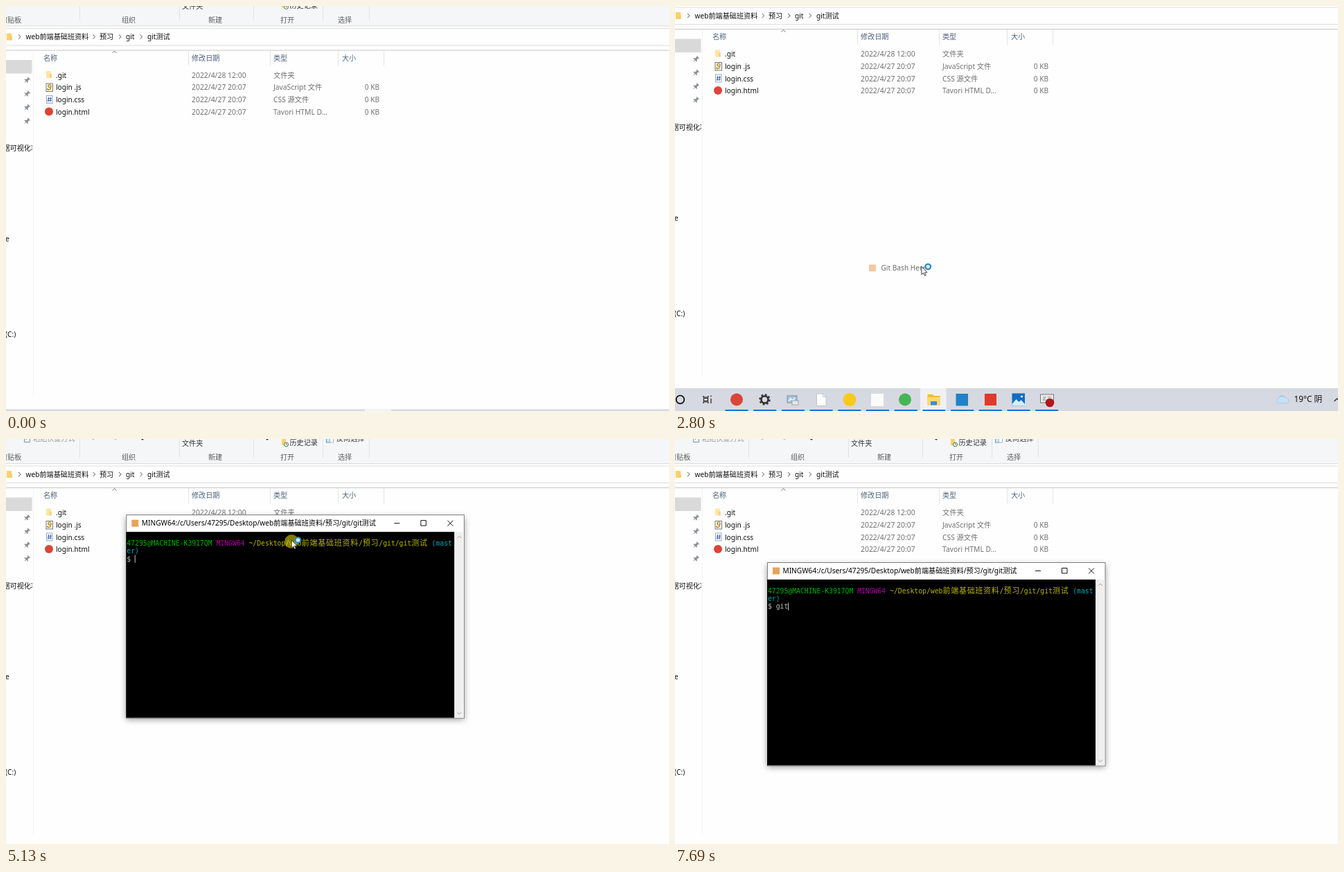
An HTML page that plays this animation: 957 px wide and 585 px high, repeating every 8 s.

```html
<!DOCTYPE html>
<html lang="zh">
<head>
<meta charset="utf-8">
<title>Git Bash Here</title>
<style>
html, body { margin: 0; width: 100%; height: 100%; overflow: hidden; background: #fefefe; }
svg { display: block; width: 100vw; height: 100vh; }
text { font: 10.15px "Noto Sans", "Noto Sans CJK SC", "Noto Sans CJK", sans-serif; white-space: pre; }
.mono { font: 9.75px "DejaVu Sans Mono", "Noto Sans Mono", "Noto Sans CJK SC", monospace; }
.wide { font: 11px "Noto Sans CJK SC", "Noto Sans CJK", sans-serif; letter-spacing: .74px; }
</style>
</head>
<body>
<svg id="stage" viewBox="0 0 957 585" preserveAspectRatio="none"></svg>
<script>
const LOOP = 8000;
const stage = document.getElementById('stage');

function el(parent, tag, attrs = {}, content) {
  const node = document.createElementNS('http://www.w3.org/2000/svg', tag);
  for (const k in attrs) node.setAttribute(k, attrs[k]);
  if (content !== undefined) node.textContent = content;
  parent.appendChild(node);
  return node;
}
const group = parent => el(parent, 'g');
const rect = (p, x, y, width, height, fill, more) => el(p, 'rect', { x, y, width, height, fill, ...more });
const disc = (p, cx, cy, r, fill, more) => el(p, 'circle', { cx, cy, r, fill, ...more });
const line = (p, d, stroke, width = 1, more) =>
  el(p, 'path', { d, stroke, 'stroke-width': width, fill: 'none', ...more });
const shape = (p, d, fill, more) => el(p, 'path', { d, fill, ...more });
// Text is placed by its left edge and vertical middle.
const label = (p, x, y, s, fill = '#111', more) => el(p, 'text', { x, y: y + 3.7, fill, ...more }, s);
const show = (node, on) => { node.style.display = on ? '' : 'none'; };
const move = (node, [x, y]) => node.setAttribute('transform', `translate(${x.toFixed(2)} ${y.toFixed(2)})`);

// Linear track through [time, ...values] points.
function track(points, t) {
  if (t <= points[0][0]) return points[0].slice(1);
  for (let i = 1; i < points.length; i++) {
    const a = points[i - 1], b = points[i];
    if (t <= b[0]) {
      const k = (t - a[0]) / (b[0] - a[0]);
      return a.slice(1).map((v, j) => v + (b[j + 1] - v) * k);
    }
  }
  return points[points.length - 1].slice(1);
}
const within = (t, ...spans) => spans.some(([a, b]) => t >= a && t < b);

// ---------- Explorer ----------
const desk = group(stage);
const GRAY = '#707070', HEAD = '#4c607a';

function ribbon(p) {
  rect(p, 0, -60, 957, 95.5, '#f5f6f7');
  line(p, 'M0 35.5H957', '#dcddde');
  line(p, 'M106.5-60V27M250.5-60V27M357.5-60V27M457.5-60V27M524.5-60V27', '#e1e2e3');
  [[-8, '剪贴板'], [167, '组织'], [292, '新建'], [396, '打开'], [479, '选择']]
    .forEach(([x, s]) => label(p, x, 26.5, s, '#5c5c5c'));
  line(p, 'M26.5-4V4.5H34.5V-4M28.5 1.5L31-1', '#7d8fa8');
  label(p, 39, -.5, '粘贴快捷方式', '#9a9a9a');
  label(p, 254, 6.5, '文件夹', '#333');
  label(p, 409.5, 5.5, '历史记录', '#333');
  label(p, 477, -.5, '反向选择', '#333');
  rect(p, 398, -2, 6, 11, '#f5d272');
  disc(p, 404.5, 8, 3, '#f5f6f7', { stroke: '#3d7a3d' });
  line(p, 'M404.5 6V8H406', '#3d7a3d', .8);
  rect(p, 462.5, -4, 5, 9, '#cfe6f8', { stroke: '#5b9bd0' });
  rect(p, 467.5, -4, 5, 9, '#fff', { stroke: '#9db8cd' });
  shape(p, 'M194.500-.5h5l-2.500 2.500zM374.500-.5h5l-2.500 2.500z', '#333');
  shape(p, 'M123.500-.5h5l-2.500 2zM155.500-.5h5l-2.500 2z', '#bbb');
}

function folder(p, x, y, fill) {
  rect(p, x, y, 7, 10, fill);
  rect(p, x + 5, y + 4, 3, 6, '#f6c95e', { opacity: .7 });
}

function address(p) {
  line(p, 'M0 39H957M0 63.5H957', '#dedede');
  line(p, 'M0 70.5H957', '#c6c6c6');
  folder(p, 1, 46, '#fbd26b');
  [18, 125.5, 163, 193.5].forEach(x => line(p, `M${x} 48l3.200 3-3.200 3`, '#555'));
  [[28.5, 'web前端基础班资料'], [135, '预习'], [173, 'git'], [204, 'git测试']]
    .forEach(([x, s]) => label(p, x, 51, s));
}

function sidebar(p) {
  rect(p, 0, 84.5, 37.5, 19.5, '#d9d9d9');
  line(p, 'M39.5 71V572', '#f4f4f4');
  for (let i = 0; i < 4; i++) {
    const pin = group(p);
    pin.setAttribute('transform', `translate(30.5 ${113.5 + i * 19.7}) rotate(45)`);
    shape(pin, 'M-2.500-4h5v1h-1v3l2 1.500v.8h-7v-.8l2-1.500v-3h-1zM-.4 2h.9v3h-.9z', '#8a8f96');
  }
  const clip = el(p, 'clipPath', { id: 'side' });
  rect(clip, 0, 71, 38, 520, '#000');
  const names = el(p, 'g', { 'clip-path': 'url(#side)' });
  label(names, -4.5, 212, '据可视化项目');
  label(names, -1, 343, 'e');
  label(names, -1, 481, '(C:)');
  label(names, -2, 498, '·', '#888');
}

function files(p) {
  line(p, 'M263.5 71V93M381.5 71V93M479.5 71V93M545.5 71V93', '#e4e4e4');
  line(p, 'M153.500 74.500l3-3 3 3', '#777');
  [[54, '名称'], [268, '修改日期'], [386, '类型'], [485, '大小']]
    .forEach(([x, s]) => label(p, x, 81.5, s, HEAD));
  const rows = [
    ['.git', '2022/4/28 12:00', '文件夹', ''],
    ['login .js', '2022/4/27 20:07', 'JavaScript 文件', '0 KB'],
    ['login.css', '2022/4/27 20:07', 'CSS 源文件', '0 KB'],
    ['login.html', '2022/4/27 20:07', 'Tavori HTML D...', '0 KB']
  ];
  rows.forEach(([name, date, kind, size], i) => {
    const y = 106.5 + i * 17.7;
    label(p, 72, y, name);
    label(p, 268, y, date, GRAY, { style: 'font-size:10.4px' });
    label(p, 386, y, kind, GRAY, { style: 'font-size:10.3px' });
    label(p, 539, y, size, GRAY, { 'text-anchor': 'end' });
  });
  folder(p, 58, 100.5, '#fde6a4');
  rect(p, 58, 118.5, 9.5, 11.5, '#fff', { stroke: '#777' });
  line(p, 'M64.500 120.500c-5-1-4 3-1.500 3.500s2 4-3 3.500', '#c9a227', 2);
  line(p, 'M65 121v3M60 125.500v2', '#444');
  rect(p, 58.5, 136, 8.5, 11, '#fff', { stroke: '#9ab' });
  line(p, 'M61.700 138l-.8 7M64.700 138l-.8 7M60 140.300h6M59.700 143h6', '#3465b5', 1);
  disc(p, 62, 159, 6, '#db4437');
}

rect(desk, 0, -80, 957, 740, '#fefefe');
ribbon(desk);
address(desk);
sidebar(desk);
files(desk);
const focus = rect(desk, 52.5, 115, 490, 17.5, 'none', { stroke: '#9fd3ef' });

// ---------- Taskbar ----------
const bar = group(desk);
const grad = el(bar, 'linearGradient', { id: 'tint' });
[[0, '#e6d3e2'], [.45, '#dccbe0'], [1, '#d6d8e2']]
  .forEach(([offset, c]) => el(grad, 'stop', { offset, 'stop-color': c }));
rect(bar, 0, 589, 957, 60, '#d6d9e1');
const tint = rect(bar, 598, 589, 359, 60, 'url(#tint)');
const hotRecorder = rect(bar, 518, 589, 38, 34, '#f3f5f8');
const hotFolder = rect(bar, 354, 589, 37.5, 34, '#eff1f5');
const hotTerm = group(bar);
rect(hotTerm, 558, 589, 39.5, 34, '#eff1f5');
rect(hotTerm, 571, 599, 13, 13, '#e9824f');
rect(hotTerm, 558, 620, 39.5, 2.5, '#0078d7');

disc(bar, 7.5, 605.5, 5.8, 'none', { stroke: '#111', 'stroke-width': 1.8 });
line(bar, 'M41 600v2h7v-2M41 611v-2h7v2M41.500 603.500h6v4h-6zM52 599.500v2M52 604v7', '#222', 1.2);
disc(bar, 89, 605.5, 9, '#db4437');
disc(bar, 129.5, 605.5, 5, 'none', { stroke: '#333', 'stroke-width': 2.6 });
disc(bar, 129.5, 605.5, 7, 'none', { stroke: '#333', 'stroke-width': 2.4, 'stroke-dasharray': '2.75 2.75' });
rect(bar, 162, 600, 14, 10, '#a9c6dc', { stroke: '#7e8c99' });
line(bar, 'M164 608l3-4 3 3 3-4', '#fff', 1.3);
rect(bar, 169, 607, 9, 6, '#e6e9ec', { stroke: '#8c98a3', 'stroke-width': .8 });
shape(bar, 'M204.500 597h9l4.500 4.500v13h-13.500z', '#fff', { stroke: '#b6b9be', 'stroke-width': .8 });
line(bar, 'M213.500 597v4.500h4.500', '#b6b9be', .8);
disc(bar, 252, 605.5, 9.5, '#fbc91b');
rect(bar, 283, 597, 18, 18, '#fbfbfb');
disc(bar, 332, 605.5, 9, '#45b653');
shape(bar, 'M364.500 598h7l2 2h9v13.500h-18z', '#f5b93a');
rect(bar, 364.5, 602, 18, 11.5, '#fcd873');
rect(bar, 369, 608, 9, 5.5, '#3d8fd8');
rect(bar, 405.5, 597, 17.5, 17.5, '#1f82c8');
rect(bar, 447, 597, 17, 17, '#e2392c');
rect(bar, 486.5, 596.5, 18.5, 18, '#0f6fc2');
shape(bar, 'M486.500 612l6-7 4 4 3-3 5.500 6v2.500h-18.500z', '#d9ecfa');
disc(bar, 500.5, 601, 1.6, '#fff');
rect(bar, 527.5, 598, 19, 12, '#e9e9e9', { stroke: '#777' });
line(bar, 'M531 602h4l-4 4h4M538 602h5', '#888');
const recDot = disc(bar, 541, 610, 6.3, '#b3161b');
for (let i = 0; i < 12; i++) rect(bar, 72.5 + i * 40.7, 620, 33, 2.2, '#0078d7');
disc(bar, 876, 604, 4.5, '#8fc3ea');
shape(bar, 'M871 611a3.800 3.800 0 0 1 0-7a5 5 0 0 1 9-1a4 4 0 0 1 3 8z', '#c5e1f6', { stroke: '#8fbbe0', 'stroke-width': .6 });
label(bar, 893.5, 605.5, '19°C 阴', '#111', { style: 'font-size:11.8px' });
line(bar, 'M951.500 608l4-4 4 4', '#222', 1.2);

// ---------- Context menus ----------
const menu = group(stage);
function panel(p, x, y, w, h) {
  rect(p, x + 3, y + 3, w, h, '#000', { opacity: .22 });
  rect(p, x + 1.5, y + 1.5, w, h, '#000', { opacity: .3 });
  rect(p, x, y, w, h, '#eeeeee', { stroke: '#a3a3a3' });
}
const rule = (p, x1, x2, y) => line(p, `M${x1} ${y}H${x2}`, '#9b9b9b');
panel(menu, 269.5, 188.5, 178, 276);
const hover = rect(menu, 272, 0, 173.5, 18.5, '#fff');
[268.5, 292.5, 390.5, 414.5, 438.5].forEach(y => rule(menu, 278, 438.5, y));
const items = [
  [201.5, '查看(V)', '>'], [220, '排序方式(O)', '>'], [238.5, '分组依据(P)', '>'], [257, '刷新(E)'],
  [281, '自定义文件夹(F)...'], [305, '粘贴(P)', '-'], [323.5, '粘贴快捷方式(S)', '-'],
  [342, '撤消 移动(U)'], [360, 'Git GUI Here', 'g'], [378.5, 'Git Bash Here', 'g'],
  [403, '授予访问权限(G)', '>'], [427, '新建(W)', '>'], [451.5, '属性(R)']
];
function entry(p, [y, s, kind]) {
  label(p, 297.5, y, s, kind === '-' ? '#858585' : '#000');
  if (kind === '>') line(p, `M432.500 ${y - 5.5}l5.500 5.500-5.500 5.500`, '#222', 1.1);
  if (kind === 'g') rect(p, 280, y - 5, 10, 10, '#e8a35f');
}
items.forEach(item => entry(menu, item));
label(menu, 401, 342, 'Ctrl+Z', '#000');

const sub = group(menu);
panel(sub, 445.5, 228.5, 133, 145);
[[239, '名称'], [257.3, '修改日期'], [275.6, '类型'], [293.9, '大小'], [318, '递增(A)'], [336.3, '递减(D)'], [361, '更多(M)...']]
  .forEach(([y, s]) => label(sub, 473, y, s, '#000'));
rule(sub, 453, 571, 306);
rule(sub, 453, 571, 348.5);

const chosen = group(stage);
entry(chosen, items[9]);

// ---------- Terminal ----------
const term = group(stage);
const blur = el(term, 'filter', { id: 'soft', x: '-10%', y: '-10%', width: '120%', height: '120%' });
el(blur, 'feGaussianBlur', { stdDeviation: 5 });
rect(term, 0, 4, 488, 292, '#000', { opacity: .4, filter: 'url(#soft)' });
rect(term, .5, .5, 487.5, 293.5, '#fff', { stroke: '#7d7d7d' });
rect(term, 0, 25, 474, 268.5, '#000');
rect(term, 474, 25, 13.5, 268.5, '#f0f0f0');
line(term, 'M478 34l3-3 3 3M478 285.500l3 3 3-3', '#a0a0a0');
rect(term, 8, 7.5, 10, 10, '#e8a35f');
label(term, 22.5, 12.3, 'MINGW64:/c/Users/47295/Desktop/web前端基础班资料/预习/git/git测试', '#000');
line(term, 'M387 12.500h8M425.500 8.500h7.500v7.500h-7.500zM464 8.500l8 8M472 8.500l-8 8', '#111');

const CELL = 5.87;
const prompt = group(term);
const run = (col, row, s, fill, cls = 'mono') =>
  el(prompt, 'text', { x: 1 + col * CELL, y: 45.2 + row * 11.1, fill, class: cls }, s);
const GOLD = '#b9b500', CYAN = '#00a8b4';
run(0, 0, '47295@MACHINE-K3917QM', '#00b400');
run(22, 0, 'MINGW64', '#b000b0');
run(30, 0, '~/Desktop/web', GOLD);
run(43, 0, '前端基础班资料', GOLD, 'wide');
run(57, 0, '/', GOLD);
run(58, 0, '预习', GOLD, 'wide');
run(62, 0, '/git/git', GOLD);
run(70, 0, '测试', GOLD, 'wide');
run(75, 0, '(mast', CYAN);
run(0, 1, 'er)', CYAN);
run(0, 2, '$', '#bfbfbf');
const typed = run(2, 2, '', '#bfbfbf');
const caret = rect(prompt, 0, 58.5, 1, 11, '#c8c8c8');

// ---------- Pointer ----------
const pointer = group(stage);
const press = disc(pointer, 0, 2, 10, '#ffee00', { opacity: .52 });
const arrow = shape(pointer, 'M0 0V11.500L2.700 9L4.500 13L6.300 12.200L4.500 8.300H8.200Z', '#fff',
  { stroke: '#111', 'stroke-width': .8 });
const busy = disc(pointer, 9.3, 0, 3.8, '#d8eefb', { stroke: '#2e86c1', 'stroke-width': 2.2 });
const beam = group(pointer);
const BEAM = 'M-2.500-5.500H-.6L0-5 .6-5.500H2.500M0-5V5M-2.500 5.500H-.6L0 5 .6 5.500H2.500';
line(beam, BEAM, '#000', 2.2);
line(beam, BEAM, '#fff', 1);

// ---------- Motion ----------
const CAMERA = [[0, -6.5], [70, -6.5], [200, -18], [450, -37], [3530, -37], [3960, -18.5],
  [4170, -4], [4370, -4], [4520, 0]];
const POINTER = [[0, 538, 596], [70, 538, 590], [330, 530, 572], [480, 480, 480], [870, 270, 189],
  [940, 270, 189], [1130, 302, 222], [1300, 330, 236], [1520, 348, 240], [1690, 360, 291],
  [1760, 360, 292], [2100, 360, 335], [2460, 356, 377], [2800, 356, 377], [3050, 335, 270],
  [3460, 226, 14], [3960, 222, 13], [4370, 222, 13], [4700, 270, 50], [5130, 412, 146],
  [5450, 452, 166], [5600, 444, 176], [5880, 348, 196], [6020, 348, 196], [6200, 236, 274],
  [6370, 220, 268]];
const WINDOW = [[4370, -1, -1.5], [4480, -1, -1.5], [4800, 52, 32], [5130, 173, 109], [5200, 196, 121],
  [5520, 233, 146], [5680, 218, 158], [5950, 133, 178]];

function draw(now) {
  const t = now % LOOP;
  const [cam] = track(CAMERA, t);
  move(desk, [0, cam]);
  show(focus, within(t, [800, 2700]));
  show(hotRecorder, t < 380);
  show(recDot, t < 3500);
  show(hotFolder, within(t, [800, 3050]));
  show(hotTerm, t >= 3050);
  show(tint, t >= 3530);

  const [x, y] = track(POINTER, t);
  show(menu, within(t, [900, 2660]));
  show(sub, within(t, [1400, 1620]));
  const hit = items.find(([cy]) => Math.abs(cy - Math.min(y, 999)) < 9.3) ||
    (within(t, [1620, 1900]) ? items[4] : null);
  const row = within(t, [1640, 1850]) ? items[4] : hit;
  show(hover, row && t > 1000);
  if (row) hover.setAttribute('y', row[0] - 9.2);
  show(chosen, within(t, [2660, 2960]));
  chosen.setAttribute('opacity', Math.max(0, 1 - (t - 2660) / 330));

  const [wx, wy] = track(WINDOW, t);
  show(term, t >= 3050);
  move(term, [wx, wy + cam]);
  show(prompt, t >= 3400);
  const keys = [7360, 7500, 7640].filter(k => t >= k).length;
  typed.textContent = 'git'.slice(0, keys);
  caret.setAttribute('x', 12.4 + keys * CELL);
  show(caret, within(t, [3400, 4510], [5040, 5570], [6100, 6630], [7160, LOOP]));

  const text = within(t, [3200, 4100], [6080, LOOP]);
  move(pointer, [x, y]);
  show(pointer, t < 7360);
  show(arrow, !text);
  show(beam, text);
  show(busy, !text && within(t, [2700, 3400], [4800, 6080]));
  show(press, within(t, [2640, 2720], [4370, 5900]));
}

function tick() {
  draw(performance.now());
  requestAnimationFrame(tick);
}
tick();
</script>
</body>
</html>
```
